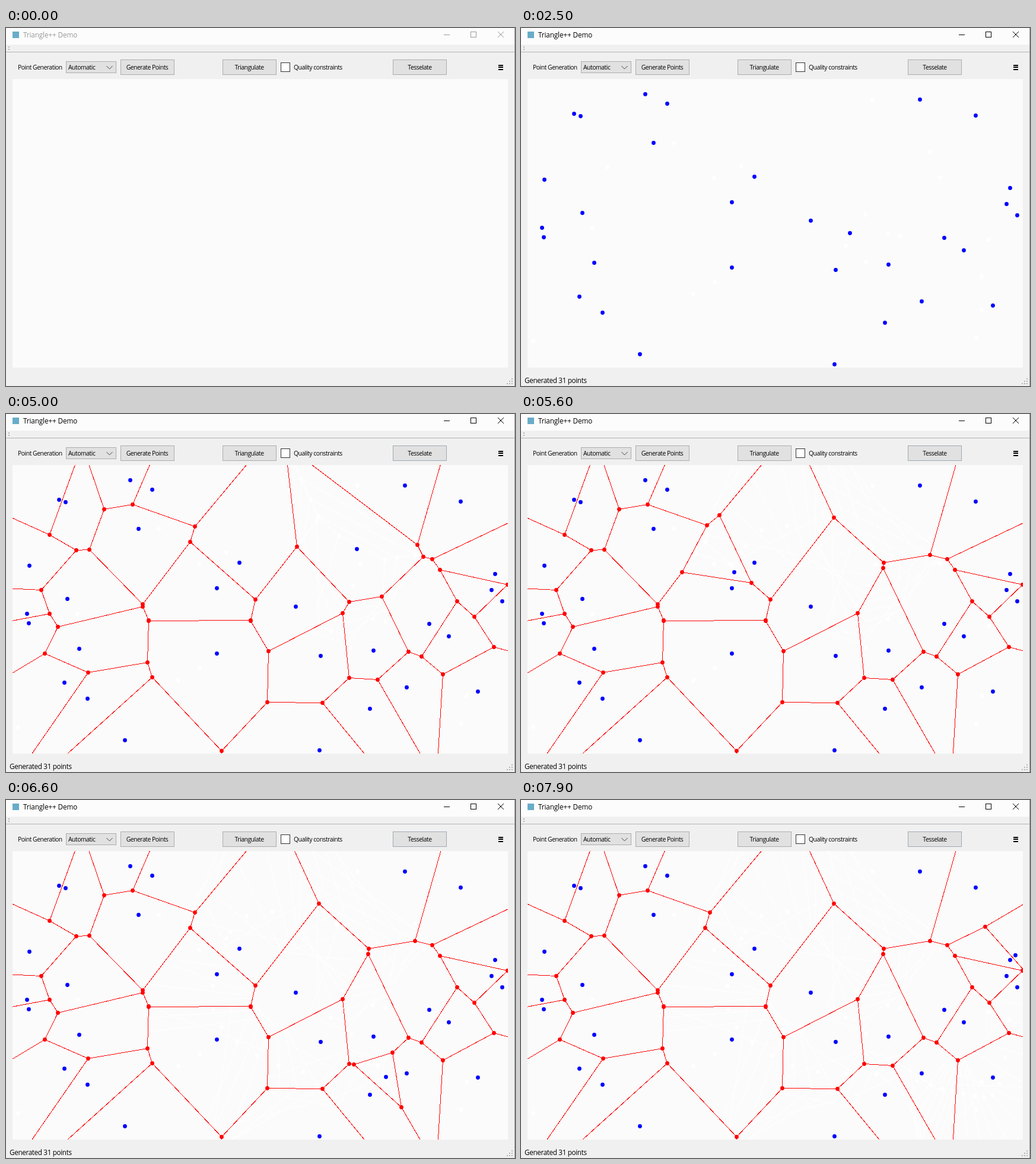
An HTML page for the animation above (8000 ms loop, 858 by 603 pixels).

```html
<!DOCTYPE html>
<html lang="en">
<head>
<meta charset="utf-8">
<title>Triangle++ Demo</title>
<style>
  html, body { margin: 0; width: 100%; height: 100%; overflow: hidden; background: #f0f0f0; }
  svg { display: block; }
  text { font: 10.4px "Open Sans", "Noto Sans", sans-serif; letter-spacing: -.47px; fill: #000; }
  .title { font-size: 11.7px; letter-spacing: -.1px; }
  .status { font-size: 11.7px; letter-spacing: -.34px; }
  .mid { text-anchor: middle; }
  .crisp { shape-rendering: crispEdges; }
  .button { fill: #e1e1e1; stroke: #adadad; }
  .button.hover { fill: #e5f1fb; stroke: #0078d7; }
  .button.press { fill: #cce4f7; stroke: #005499; }
  .button.left { stroke: #9eaab3; }
  .controls { fill: none; stroke: #000; }
  .inactive .controls { stroke: #999; }
  .inactive .title { fill: #999; }
  .plot path { fill: none; }
  .dots { stroke-width: 6.8; stroke-linecap: round; }
</style>
</head>
<body>
<svg id="window" width="858" height="603" viewBox="0 0 858 603">
  <rect width="858" height="603" fill="#f0f0f0"/>
  <rect width="858" height="28" fill="#fcfcfc"/>
  <rect x="11" y="6" width="11" height="11" fill="#68acc9"/>
  <text class="title" x="29" y="16">Triangle++ Demo</text>
  <g class="controls">
    <path class="crisp" d="M738 11.5h10M783.5 6.5h9v9h-9z"/>
    <path d="M829 6l10 10M839 6l-10 10"/>
  </g>
  <path class="crisp" d="M0 40.5h858" stroke="#b4b4b4"/>
  <path class="crisp" d="M4 32h2M4 36h2" stroke="#b0b0b0" stroke-width="2"/>
  <path class="crisp" d="M857.5 0v603" stroke="#a0a0a0"/>

  <text x="20" y="70">Point Generation</text>
  <rect class="button crisp" x="101.5" y="56.5" width="84" height="19"/>
  <text x="105" y="70">Automatic</text>
  <path d="M169.5 64l5 5 5-5" fill="none" stroke="#444"/>
  <rect id="generate" class="button crisp" x="193.5" y="53.5" width="90" height="25"/>
  <text class="mid" x="238" y="70">Generate Points</text>
  <rect class="button crisp" x="365.5" y="53.5" width="90" height="25"/>
  <text class="mid" x="410" y="70">Triangulate</text>
  <rect class="crisp" x="463.5" y="58.5" width="15" height="15" fill="#fff" stroke="#333"/>
  <text x="485" y="70">Quality constraints</text>
  <rect id="tesselate" class="button crisp" x="652.5" y="53.5" width="90" height="25"/>
  <text class="mid" x="697.5" y="70">Tesselate</text>
  <path class="crisp" d="M830 63h8M830 66h8M830 70h8" stroke="#000" stroke-width="2"/>

  <rect x="11" y="86" width="835" height="486" fill="#fbfbfb"/>
  <svg class="plot" x="11" y="86" width="835" height="486" viewBox="11 86 835 486">
    <path id="oldEdges" class="crisp" stroke="#fff"/>
    <path id="oldDots" class="dots" stroke="#fff"/>
    <path id="edges" class="crisp" stroke="#f00"/>
    <path id="corners" class="dots" stroke="#f00"/>
    <path id="sites" class="dots" stroke="#00f"/>
  </svg>

  <text id="status" class="status" x="6" y="598"></text>
  <path class="crisp" d="M852 591h2M848 595h2M852 595h2M844 599h2M848 599h2M852 599h2" stroke="#b5b5b5" stroke-width="2"/>
</svg>
<script>
const LOOP = 8000, TICK = 100;
const CLICKS = [11, 17, 23], TESSELATE = 34, DRAG_START = 46, DRAG_END = 79;

const pairs = text => text.split(" ").map(p => p.split(",").map(Number));
const fixed = pairs("209,111 246,127 89,144 100,148 223,193 39,255 103,311 35,336 38,352 123,395 " +
  "98,452 137,479 200,549 393,250 355,293 355,403 488,324 530,407 619,398 613,496 528,566 " +
  "675,460 713,353 746,374 795,467 672,120 766,147 824,269 818,296 836,315");

let seed = 7;
const random = () => (seed = seed * 16807 % 2147483647) / 2147483647;
const scatter = count => Array.from({ length: count }, () => [20 + 820 * random(), 95 + 470 * random()]);
const sets = [scatter(8), scatter(12)];

// Key points of the dragged site: tick, x, y
const keys = pairs("46,554,345 50,591,227 54,405,195 58,349,352 62,458,447 66,640,466 71,745,494 75,806,478 79,833,261");

// Smooth curve through the key points
function dragged(tick) {
  const last = keys.length - 1;
  const i = Math.min(last - 1, keys.findLastIndex(k => k[0] <= tick));
  const u = (tick - keys[i][0]) / (keys[i + 1][0] - keys[i][0]);
  return [1, 2].map(axis => {
    const [a, b, c, d] = [-1, 0, 1, 2].map(o => keys[Math.min(last, Math.max(0, i + o))][axis]);
    return Math.round(b + u / 2 * (c - a + u * (2 * a - 5 * b + 4 * c - d + u * (3 * (b - c) + d - a))));
  });
}

const at = ([x, y]) => `${Math.floor(x) + .5} ${Math.floor(y) + .5}`;
const dotPath = points => points.map(p => `M${at(p)}h0`).join("");
const sq = (a, b) => (a[0] - b[0]) ** 2 + (a[1] - b[1]) ** 2;

// Each polygon corner is [x, y, neighbour across the edge that starts there]
function clip(poly, site, other, id) {
  const out = [];
  poly.forEach((a, k) => {
    const b = poly[(k + 1) % poly.length];
    const da = sq(a, site) - sq(a, other), db = sq(b, site) - sq(b, other);
    if (da <= 0) out.push(a);
    if (da <= 0 !== db <= 0) {
      const t = da / (da - db);
      out.push([a[0] + t * (b[0] - a[0]), a[1] + t * (b[1] - a[1]), da <= 0 ? id : a[2]]);
    }
  });
  return out;
}

function voronoi(sites) {
  let edges = "", corners = "";
  sites.forEach((site, i) => {
    let poly = [[-2000, -2000, -1], [3000, -2000, -1], [3000, 3000, -1], [-2000, 3000, -1]];
    sites.forEach((other, j) => { if (j !== i) poly = clip(poly, site, other, j); });
    poly.forEach((a, k) => {
      if (a[2] <= i) return;
      const b = poly[(k + 1) % poly.length];
      edges += `M${at(a)}L${at(b)}`;
      corners += dotPath([a, b]);
    });
  });
  return { edges, corners };
}

const drag = Array.from({ length: DRAG_END - DRAG_START + 1 }, (_, i) => dragged(DRAG_START + i));
const diagrams = drag.map(p => voronoi([...fixed, p]));
const $ = id => document.getElementById(id);
const setPath = (id, d) => $(id).setAttribute("d", d);
const setButton = (id, state) => $(id).setAttribute("class", "button crisp " + state);

function render(tick) {
  $("window").setAttribute("class", tick < CLICKS[0] ? "inactive" : "");
  setButton("generate", CLICKS.includes(tick) ? "press" : CLICKS.includes(tick - 1) ? "hover" : "");
  setButton("tesselate", tick < TESSELATE ? "" : tick === TESSELATE + 1 ? "press" : tick < DRAG_START ? "hover" : "left");

  const step = Math.max(0, tick - DRAG_START);
  const clicks = CLICKS.filter(c => c < tick).length;
  const sites = clicks ? [...sets, [...fixed, drag[step]]][clicks - 1] : [];
  $("status").textContent = clicks ? `Generated ${sites.length} points` : "";
  setPath("sites", dotPath(sites));

  const { edges, corners } = tick < TESSELATE + 2 ? { edges: "", corners: "" } : diagrams[step];
  setPath("edges", edges);
  setPath("corners", corners);

  // Erased marks stay faintly visible on the off-white sheet
  const past = diagrams.slice(0, step);
  const pastSites = [...sets.slice(0, Math.max(0, clicks - 1)).flat(), ...drag.slice(0, step)];
  setPath("oldEdges", past.map(d => d.edges).join(""));
  setPath("oldDots", dotPath(pastSites) + past.map(d => d.corners).join(""));
}

const start = performance.now();
let shown = -1;
function frame() {
  const tick = Math.floor((performance.now() - start) % LOOP / TICK);
  if (tick !== shown) render(shown = tick);
  requestAnimationFrame(frame);
}
frame();
</script>
</body>
</html>
```
